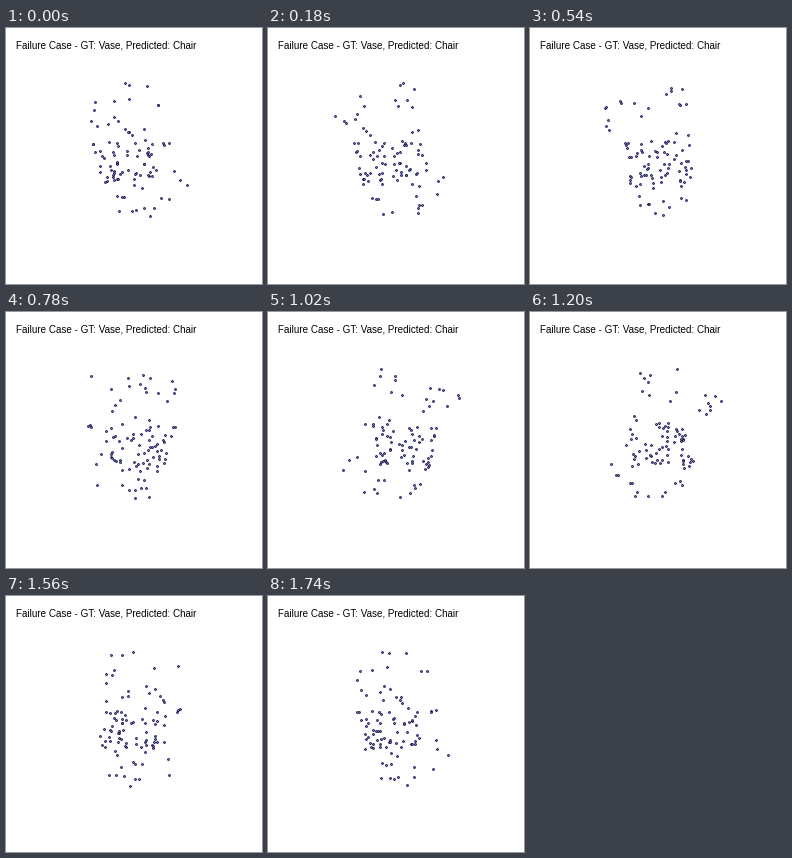
Recreate the animation shown at these times as a matplotlib script. Size 256 px wide and 256 px high, loop 1800 ms.

```python
import numpy as np
import matplotlib.pyplot as plt
from matplotlib.animation import FuncAnimation

SIZE, DPI = 256, 100
PX = 72 / DPI                 # one pixel in points
FRAMES, STEP_MS = 30, 60
CX, CY = 127.5, 123.3         # projection centre
CAMERA = 225                  # camera distance in pixels

# Landmarks of the cloud: x (right), z (towards viewer), y (down)
RIM = [
    (12.7, 13, -62), (-8.5, 22, -62), (-4.5, 12, -63.5), (-4.1, 22, -47.5),
    (-17.6, 22, -45.5), (-38.8, -1.5, -50.5), (28.2, -34, -54.3),
    (24.4, -3.5, -48), (-38.9, 6.4, -40.5),
    (-49.7, -35, -36), (-32.5, -54.3, -34.6), (-23.2, -40.3, -41),
    (-19.4, -52.4, -37.8), (-10.5, -50.2, -28), (-6.4, -51, -23.7),
    (-2.6, -48.6, -20), (-41.4, -27.7, -28.5),
]
BODY = [
    (50.4, 9, 32), (41.3, 25, 25.3), (39.5, 1, 19.5),
    (33, -28, -10), (33, -26, -8), (39, -23, -10),
    (9.4, 23, -20.5), (-4.8, 31, -17.5),
    (-41.5, 0, -8), (-42, -8, -8), (-40, -8, 0), (-36, -14, -1),
    (-34, -12, 4), (-36, -10, 15), (-35, -9, 21), (-29, -14, 26.5),
    (-29, -14, 31),
]
BASE = [
    (14.3, 17.6, 59.6), (19.4, 12, 53.5), (8.3, 29, 49.2), (1.3, 31, 50),
    (-15.5, 0, 59.3), (-2.5, -3.5, 60.6), (-18.7, -16, 47),
    (-10.4, -21, 49), (-13.2, -13, 48), (22.4, 35, 39), (36.2, -11, 50),
]


def filler(count, seed=4):
    """Scattered points around the belly of the vase."""
    rng = np.random.default_rng(seed)
    ang = rng.uniform(0, 2 * np.pi, count)
    rad = np.sqrt(rng.uniform(0.2, 1, count))
    return np.column_stack([
        -3 + 27 * rad * np.cos(ang),
        40 * rad * np.sin(ang),
        rng.uniform(-12, 32, count),
    ])


cloud = np.vstack([RIM, BODY, BASE, filler(50)])


def project(turn):
    x, z, y = cloud.T
    c, s = np.cos(turn), np.sin(turn)
    side, near = x * c + z * s, z * c - x * s
    scale = CAMERA / (CAMERA - near)
    pos = np.column_stack([CX + side * scale, CY + y * scale])
    return np.floor(pos) + 0.5


fig = plt.figure(figsize=(SIZE / DPI, SIZE / DPI), dpi=DPI, facecolor="white")
ax = fig.add_axes([0, 0, 1, 1])
ax.set(xlim=(0, SIZE), ylim=(SIZE, 0))
ax.axis("off")

ax.text(9.5, 20, "Failure Case - GT: Vase, Predicted: Chair",
        family="Liberation Sans", size=9.85 * PX, color="black", va="baseline")
dots = ax.scatter(*project(0).T, s=(1.9 * PX) ** 2, c="#7c7cc4",
                  edgecolors="#12124e", linewidths=0.8 * PX)


def draw(i):
    dots.set_offsets(project(2 * np.pi * i / FRAMES))
    return (dots,)


anim = FuncAnimation(fig, draw, frames=FRAMES, interval=STEP_MS,
                     repeat=True, repeat_delay=0)
plt.show()
```
